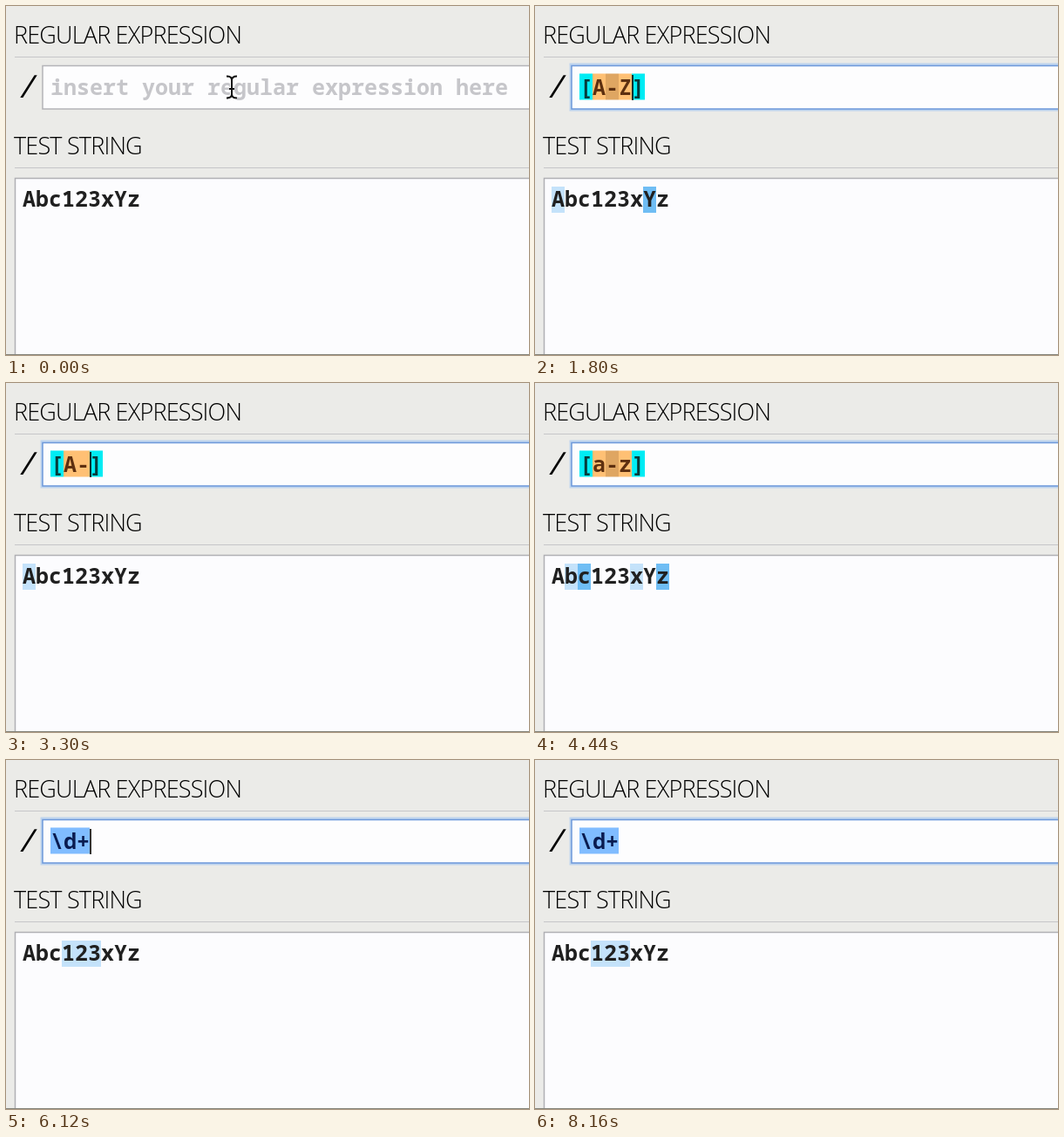
An HTML page that plays this animation: 600 px wide and 400 px high, repeating every 8.28 s.

```html
<!DOCTYPE html>
<html lang="en">
<head>
<meta charset="utf-8">
<title>Regular expression tester</title>
<style>
  html, body { margin: 0; width: 100%; height: 100%; overflow: hidden; background: #ebebe8; }
  svg { display: block; }
  .head { font: 300 27px "Open Sans", sans-serif; letter-spacing: -.8px; }
  .mono { font: 600 25px "Noto Sans Mono", monospace; white-space: pre; }
  .slash { font: italic 500 36px "Noto Sans Mono", monospace; }
</style>
</head>
<body>
<svg width="600" height="400" viewBox="0 0 600 400">
  <defs>
    <path id="beam" d="M-6-12.5Q0-12.5 0-8V8Q0 12.5-6 12.5M6-12.5Q0-12.5 0-8M0 8Q0 12.5 6 12.5M-3 2H3"/>
  </defs>
  <rect width="600" height="400" fill="#ebebe8"/>
  <text class="head" x="9" y="43">REGULAR EXPRESSION</text>
  <text class="head" x="9" y="170">TEST STRING</text>
  <path d="M10 58.5H600M10 185.5H600" stroke="#c6c6c8"/>
  <text class="slash" x="12" y="105">/</text>

  <rect id="glow" x="41" y="67" width="580" height="52" fill="none" stroke="#bed4ee" stroke-width="3"/>
  <rect id="field" x="42" y="68.5" width="580" height="49.5" fill="#fdfdfe" stroke-width="1.5"/>
  <rect x="10.5" y="197.5" width="610" height="220" fill="#fcfcfe" stroke="#b0b0b4" stroke-width="1.5"/>
  <path d="M0 399.5H600" stroke="#85857c"/>

  <g id="marks"></g>
  <text class="mono" x="19" y="230" fill="#202020">Abc123xYz</text>
  <g id="tokens"></g>
  <text class="mono" id="entry" x="51" y="101.5"></text>
  <rect id="caret" y="79" width="1.6" height="29"/>
  <g id="mouse" fill="none">
    <use href="#beam" stroke="#fff" stroke-width="4"/>
    <use href="#beam" stroke="#111" stroke-width="2"/>
  </g>
</svg>
<script>
const LOOP = 8280, STEP = 15, DELAY = 420, FOCUS = 420;
const SUBJECT = 'Abc123xYz', HINT = 'insert your regular expression here';

// time, expression, caret column
const edits = [
  [0, '', 0], [FOCUS, '', 0],
  [660, '[', 1], [780, '[]', 2], [900, '[]', 1],
  [1020, '[A]', 2], [1200, '[A-]', 3], [1380, '[A-Z]', 4],
  [2820, '[A-]', 3], [3360, '[A]', 2], [3480, '[]', 1],
  [3600, '[a]', 2], [3720, '[a-]', 3], [3840, '[a-z]', 4],
  [4500, '[a-]', 3], [4560, '[a]', 2], [4620, '[]', 1],
  [4740, '[0]', 2], [4860, '[0-]', 3], [4920, '[0-9]', 4],
  [5400, '', 0], [5460, '\\', 1], [5520, '\\d', 2], [5640, '\\d+', 3]
];

// start, end, from x/y, to x/y, travel time
const moves = [
  [0, 660, 259, 93, 259, 93, 1],
  [2220, 2760, 262, 93, 288, 81, 180],
  [6240, 6720, 288, 81, 593, 355, 420]
];

const $ = id => document.getElementById(id);
const show = (el, on) => el.setAttribute('visibility', on ? 'visible' : 'hidden');
const box = (x, y, n, color) =>
  `<rect x="${x}" y="${y}" width="${n * STEP}" height="30" fill="${color}"/>`;

function tokenStyle(text, i) {
  if (text[0] !== '[') return ['#80bcff', '#0a1c50'];
  if ('[]'.includes(text[i])) return ['#00ecf4', '#063c3c'];
  const range = text[i] === '-' && text[i + 1] !== ']';
  return [range ? '#dfa662' : '#ffc074', '#5e3010'];
}

function drawEntry(text) {
  const styles = [...text].map((c, i) => tokenStyle(text, i));
  $('tokens').innerHTML = styles.map((s, i) => box(51 + i * STEP, 77.5, 1, s[0])).join('');
  $('entry').innerHTML = text
    ? styles.map((s, i) => `<tspan fill="${s[1]}">${text[i]}</tspan>`).join('')
    : `<tspan fill="#c6c6ca">${HINT}</tspan>`;
}

// Highlights follow the expression once typing has paused.
function settled(t) {
  return edits.findLast(([at], i) =>
    t >= at + DELAY && (i + 1 === edits.length || edits[i + 1][0] - at >= DELAY))?.[1] || '';
}

function drawMarks(pattern) {
  const hits = pattern ? [...SUBJECT.matchAll(new RegExp(pattern, 'g'))] : [];
  $('marks').innerHTML = hits.map((m, i) =>
    box(19 + m.index * STEP, 207, m[0].length, i % 2 ? '#6fbdf4' : '#c4e2fa')).join('');
}

function drawMouse(t) {
  const move = moves.find(m => t >= m[0] && t < m[1]);
  show($('mouse'), move);
  if (!move) return;
  const [start, , x0, y0, x1, y1, span] = move;
  const k = Math.min(1, (t - start) / span);
  $('mouse').setAttribute('transform', `translate(${x0 + (x1 - x0) * k} ${y0 + (y1 - y0) * k})`);
}

const begin = performance.now();
let shownText, shownPattern;

function frame() {
  const t = (performance.now() - begin) % LOOP;
  const [at, text, column] = edits.findLast(e => t >= e[0]);
  const pattern = settled(t), focused = t >= FOCUS;
  if (text !== shownText) drawEntry(shownText = text);
  if (pattern !== shownPattern) drawMarks(shownPattern = pattern);

  show($('glow'), focused);
  $('field').setAttribute('stroke', focused ? '#6c98da' : '#b4b4b8');
  $('caret').setAttribute('x', 51.2 + column * STEP);
  show($('caret'), focused && (t - at) % 1000 < 500);
  drawMouse(t);
  requestAnimationFrame(frame);
}
frame();
</script>
</body>
</html>
```
